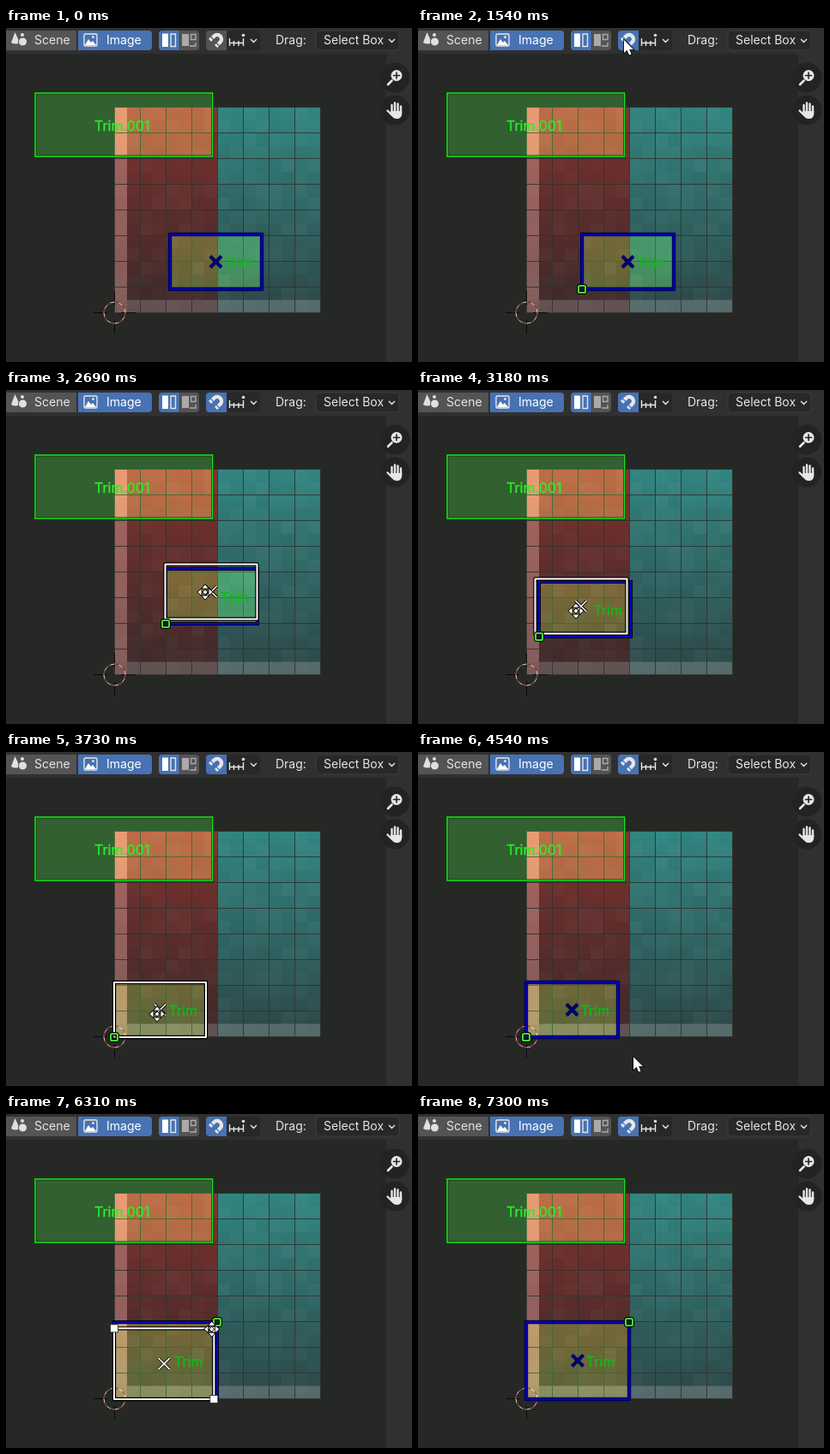
Write an HTML page that moves like this. It is 473x390 px and loops after 8 s.

```html
<!DOCTYPE html>
<html lang="en">
<head>
<meta charset="utf-8">
<title>Trim snapping</title>
<style>
html, body { margin: 0; width: 100%; height: 100%; overflow: hidden; background: #262826; }
svg { display: block; width: 473px; height: 390px; isolation: isolate; }
text { font: 14px Inter, sans-serif; fill: #e6e6e6; }
.label { font-size: 16px; stroke-width: .35; }
.add { mix-blend-mode: plus-lighter; }
.dodge { mix-blend-mode: color-dodge; }
.line { fill: none; stroke: #e6e6e6; stroke-width: 1.4; }
.btn { fill: #545454; }
.on { fill: #4772b3; }
.edge { fill: none; stroke: #000040; stroke-width: 4.4; stroke-linejoin: round; }
.core { fill: none; stroke: #0000b4; stroke-width: 2.6; stroke-linejoin: round; }
.hover .edge { stroke: #000; }
.hover .core { stroke: #fff; stroke-width: 2; }
#cross .edge { stroke: #00003c; stroke-width: 4; }
#cross .core { stroke: #000078; stroke-width: 2.6; }
.hover #cross .edge { stroke: #000; stroke-width: 3.4; }
.hover #cross .core { stroke: #fff; stroke-width: 1.7; }
.pointer { fill: #fff; stroke: #000; stroke-width: 1.6; paint-order: stroke; }
</style>
</head>
<body>
<svg viewBox="0 0 473 390">
  <defs>
    <linearGradient id="red" x2="0" y2="1"><stop stop-color="#7a3330"/><stop offset=".3" stop-color="#6b302d"/><stop offset="1" stop-color="#3c2a2a"/></linearGradient>
    <linearGradient id="teal" x2="0" y2="1"><stop stop-color="#328782"/><stop offset="1" stop-color="#2e4748"/></linearGradient>
  </defs>
  <rect width="473" height="390" fill="#262826"/>

  <!-- image, lit where the trims lie over it -->
  <rect x="126" y="93" width="120" height="239.5" fill="url(#red)"/>
  <rect x="246" y="93" width="120" height="239.5" fill="url(#teal)"/>
  <g id="cells"></g>
  <rect x="126" y="93" width="15" height="239.5" fill="#ffbeb9" opacity=".33"/>
  <rect x="141" y="317.5" width="225" height="15" fill="#fff" opacity=".19"/>
  <rect class="add" x="126" y="93" width="114.5" height="57" fill="#36020c"/>
  <rect class="dodge trim" fill="#360c12"/>
  <path id="grid" fill="none" stroke="#30332f" opacity=".88"/>

  <!-- 2D cursor -->
  <path d="M102 332.5h16M134 332.5h17M126.5 307v17M126.5 341v16" stroke="#0a0a0a"/>
  <circle cx="126.5" cy="332.5" r="12.5" fill="none" stroke="#dcc8c4"/>
  <circle cx="126.5" cy="332.5" r="12.5" fill="none" stroke="#74302c" stroke-width="1.3" stroke-dasharray="4.9"/>

  <!-- fixed trim -->
  <rect class="add" x="34" y="76" width="206.5" height="74" fill="#0c380a"/>
  <rect x="34" y="76" width="206.5" height="74" fill="none" stroke="#0a3c0a" stroke-width="3"/>
  <rect x="34" y="76" width="206.5" height="74" fill="none" stroke="#1fe01f" stroke-width="1.5"/>
  <text class="label" x="103" y="119.5" style="fill:#28f028;stroke:#28f028">Trim.001</text>

  <!-- moving trim -->
  <rect class="add trim" fill="#0c380a"/>
  <rect class="trim" fill="none" stroke="#000018" stroke-width="4"/>
  <rect class="trim" fill="none" stroke="#0808c8" stroke-width="2"/>
  <text class="label" id="name" style="fill:#14b818;stroke:#14b818">Trim</text>
  <g id="gizmo">
    <rect class="edge box"/><rect class="core box"/>
    <g id="cross"><path class="edge" d="M-6.5-6.5 6.5 6.5M6.5-6.5-6.5 6.5"/><path class="core" d="M-6.5-6.5 6.5 6.5M6.5-6.5-6.5 6.5"/></g>
    <g id="handles"></g>
  </g>
  <g id="snap">
    <rect x="-4" y="-4" width="8" height="8" rx="1.5" fill="#0a280a" fill-opacity=".5" stroke="#000" stroke-width="4"/>
    <rect x="-4" y="-4" width="8" height="8" rx="1.5" fill="none" stroke="#45d92e" stroke-width="2.2"/>
  </g>

  <!-- side region -->
  <rect x="443" y="30" width="30" height="360" fill="#303030"/>
  <g fill="#232323"><circle cx="453" cy="58" r="17.5"/><circle cx="453" cy="96" r="17.5"/></g>
  <g stroke="#e6e6e6" stroke-linecap="round" fill="none">
    <circle cx="455" cy="55.5" r="6.5" fill="#e6e6e6" stroke="none"/>
    <path d="M449.5 61.5 445 66" stroke-width="2.6"/>
    <path d="M451.5 55.5h7M455 52v7" stroke="#232323" stroke-width="1.6"/>
    <path d="M449.5 90v8M453 87.5v9M456.5 88.5v9M460 91.5v7M444.5 96.5l5 5" stroke-width="2.4"/>
    <path d="M448.3 97h13v3q-.5 6-6 6-4.5 0-7-5z" fill="#e6e6e6" stroke="none"/>
  </g>

  <!-- header -->
  <rect width="473" height="30" fill="#303030"/>
  <path class="btn" d="M0 3H82V26H0z"/>
  <path class="on" d="M84 3h82q4 0 4 4v15q0 4-4 4H84z"/>
  <path class="on" d="M182 3h20v23h-20q-4 0-4-4V7q0-4 4-4z"/>
  <path class="btn" d="M202.5 3H221q4 0 4 4v15q0 4-4 4h-18.5z"/>
  <path id="magnet" d="M237 3h20v23h-20q-4 0-4-4V7q0-4 4-4z"/>
  <path d="M257.5 3H292q4 0 4 4v15q0 4-4 4h-34.5z" fill="#282828"/>
  <rect x="361" y="3" width="97" height="23" rx="4" fill="#282828" stroke="#3d3d3d"/>
  <text x="33" y="19">Scene</text>
  <text x="117" y="19" style="fill:#fff">Image</text>
  <text x="314" y="19">Drag:</text>
  <text x="370" y="19">Select Box</text>
  <g fill="#e0e0e0">
    <path d="M10.5 5 16 17q-5 3-10 0z"/>
    <circle cx="19.5" cy="16" r="5" stroke="#545454"/><circle cx="19" cy="8" r="2"/>
    <path d="M92 20l4-7 3 4 2-2 4 5z" fill="#fff"/><circle cx="101.500" cy="10.5" r="1.5"/>
    <path d="M182 6.500h7v15.500h-7z" fill="#fff"/>
    <path d="M205 7h8v14h-8z" fill="#aaa"/>
    <circle cx="276.5" cy="8.5" r="1.8"/>
  </g>
  <g class="line">
    <rect x="91" y="7" width="15" height="14" rx="1.5"/>
    <path d="M192 7h5.500v14.500h-5.500z"/>
    <path d="M215.5 7.500h5.500v6h-5.500zM214 21h7v-4" stroke="#aaa"/>
    <path d="M-5 7V0A5 5 0 0 1 5 0V7" transform="translate(246 13) rotate(45)" stroke-width="4.4" stroke-dasharray="3 1.3 21.1 1.3 3"/>
    <path d="M260.5 12v9M260.5 17.500h16M265.5 15v6M271 15v6M276.5 12v9"/>
    <path d="M285 13l3.500 3.500L292 13M446 13l3.500 3.500L453 13"/>
  </g>

  <path id="arrow" class="pointer" d="M0 0V15L3.500 11.800 6 17.500 8.600 16.400 6.200 11H11Z"/>
  <g id="move" class="pointer">
    <path d="M0-8.500 3.500-4.500H-3.500ZM0 8.500 3.500 4.500H-3.500ZM-8.500 0-4.500 3.500V-3.500ZM8.500 0 4.500 3.500V-3.500Z"/>
    <path d="M0-2.500 2.500 0 0 2.500-2.500 0Z"/>
  </g>
</svg>
<script>
const LOOP = 8000, STEP = 15, ORIGIN = [126, 333], SIZE = [107, 64];
const $ = id => document.getElementById(id);
const all = selector => document.querySelectorAll(selector);

function add(parent, tag, attrs) {
  const el = document.createElementNS('http://www.w3.org/2000/svg', tag);
  set(el, attrs);
  return parent.appendChild(el);
}
function set(el, attrs) {
  for (const key in attrs) el.setAttribute(key, attrs[key]);
}

// Subtle seeded variation of the image tiles
let seed = 11;
const rand = () => (seed = seed * 16807 % 2147483647) / 2147483647;
for (let i = 0; i < 256; i++) {
  add($('cells'), 'rect', {
    x: 126 + i % 16 * STEP, y: 93 + (i >> 4) * STEP, width: STEP, height: i < 240 ? STEP : 14.5,
    fill: rand() < .5 ? '#000' : '#fff', opacity: rand() * .03
  });
}
let lines = '';
for (let i = 0; i <= 8; i++) lines += `M${126.5 + i * 30} 93V332.5M126 ${92.5 + i * 30}H366`;
$('grid').setAttribute('d', lines);
const handles = [0, 1, 2].map(() =>
  add($('handles'), 'rect', { width: 9, height: 9, fill: '#fff', stroke: '#222', 'stroke-width': .8 }));

// Bursts of movement: start, end, number of pictures
const bursts = [[670, 1270, 10], [1670, 2220, 9], [2350, 2350, 1], [2620, 3390, 12], [3460, 3730, 5],
  [4260, 4540, 5], [5030, 5570, 8], [5970, 6430, 7], [7160, 7300, 3]];

// Tracks: time, x, y
const pointer = [[670, 427, 365], [940, 322, 165], [1270, 240, 14], [1670, 240, 20], [1900, 242, 125],
  [2220, 240, 268], [2350, 241, 275], [2620, 238, 258], [2690, 232, 236], [2830, 231, 224], [3180, 184, 258],
  [3390, 176, 287], [3730, 176, 306], [4260, 184, 310], [4540, 251, 356], [5030, 250, 348],
  [5570, 229.5, 268.5], [5970, 231, 266], [6430, 244, 244], [7160, 245, 254], [7230, 258, 338]];
const corner = [[2350, 191, 305], [2620, 189, 291], [2690, 185.5, 267.5], [2830, 185, 253],
  [3180, 136.5, 284.5], [3390, 127, 312], [3730, ...ORIGIN]];
const opposite = [[5570, 233, 269], [5970, 235, 265], [6430, 246, 243]];

function hold(t) {
  let time = 0;
  for (const [from, to, count] of bursts) {
    if (t < from) break;
    const gap = (to - from) / (count - 1) || 1;
    time = Math.min(to, from + Math.floor((t - from) / gap + 1e-6) * gap);
  }
  return time;
}
function sample(track, t) {
  const i = track.findIndex(key => key[0] > t);
  if (i < 0) return track[track.length - 1].slice(1);
  if (!i) return track[0].slice(1);
  const a = track[i - 1], b = track[i], k = (t - a[0]) / (b[0] - a[0]);
  return [1, 2].map(n => a[n] + (b[n] - a[n]) * k);
}
const snapped = p => p.map((v, i) => ORIGIN[i] + STEP * Math.round((v - ORIGIN[i]) / STEP));
const mid = (a, b) => [(a[0] + b[0]) / 2, (a[1] + b[1]) / 2];
const box = (a, b) => ({ x: a[0], y: b[1], width: b[0] - a[0], height: a[1] - b[1] });
const place = (el, [x, y]) => el.setAttribute('transform', `translate(${x} ${y})`);
const show = (el, on) => { el.style.display = on ? '' : 'none'; };
const within = (t, from, to) => t >= from && t < to;

function draw(t) {
  const time = hold(t), scaling = t >= 5970;
  const low = sample(corner, time);
  const high = scaling ? sample(opposite, time) : [low[0] + SIZE[0], low[1] - SIZE[1]];
  const trimLow = t < 2620 ? low : snapped(low);
  const trimHigh = scaling ? snapped(high) : [trimLow[0] + SIZE[0], trimLow[1] - SIZE[1]];

  all('.trim').forEach(el => set(el, box(trimLow, trimHigh)));
  const [nx, ny] = mid(trimLow, trimHigh);
  set($('name'), { x: nx + 10, y: ny + 6.5 });

  all('.box').forEach(el => set(el, box(low, high)));
  place($('cross'), mid(low, high));
  const corners = within(t, 5430, 7160);
  $('gizmo').setAttribute('class', within(t, 2150, 4260) || corners ? 'hover' : '');
  show($('handles'), corners);
  [[low[0], high[1]], high, [high[0], low[1]]].forEach(([x, y], i) =>
    set(handles[i], { x: x - 4.5, y: y - 4.5 }));

  $('magnet').setAttribute('class', t < 1540 ? 'btn' : 'on');
  show($('snap'), t >= 1540);
  place($('snap'), scaling ? trimHigh : trimLow);

  const visible = within(t, 670, 7300);
  const moving = within(t, 2350, 4260) || within(t, 5569, 7160);
  const at = sample(pointer, time);
  show($('arrow'), visible && !moving);
  show($('move'), visible && moving);
  place($('arrow'), at);
  place($('move'), at);
}

const start = performance.now();
function tick() {
  draw((performance.now() - start) % LOOP);
  requestAnimationFrame(tick);
}
tick();
</script>
</body>
</html>
```
